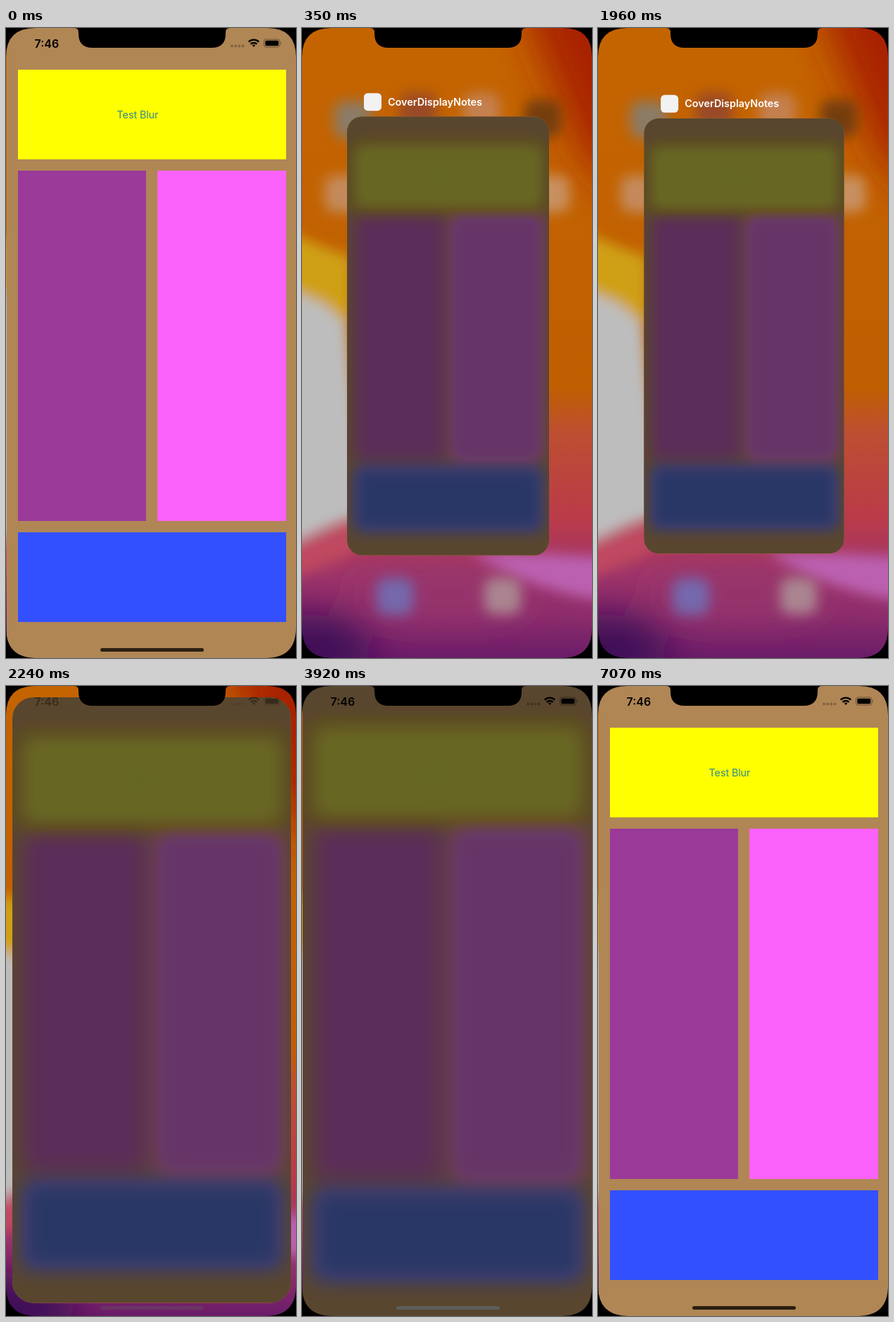
An HTML page that plays this animation: 412 by 892 pixels, repeating every 7.21 s.

```html
<!DOCTYPE html>
<html lang="en">
<head>
<meta charset="utf-8">
<title>Blurred app switcher</title>
<style>
  html, body { margin: 0; width: 100%; height: 100%; overflow: hidden; background: #000; }
  svg { display: block; width: 100%; height: 100%; }
  text { font-family: Inter, "Liberation Sans", sans-serif; }
</style>
</head>
<body>
<svg viewBox="0 0 412 892">
  <defs>
    <linearGradient id="sky" x2="0" y2="1">
      <stop offset="0" stop-color="#c46400"/>
      <stop offset=".57" stop-color="#c05f02"/>
      <stop offset=".64" stop-color="#bd4f30"/>
      <stop offset=".78" stop-color="#ba3a4a"/>
      <stop offset=".86" stop-color="#a03668"/>
      <stop offset=".93" stop-color="#8e2d6c"/>
      <stop offset="1" stop-color="#6a1c68"/>
    </linearGradient>
    <filter id="soft" x="-50%" y="-50%" width="200%" height="200%"><feGaussianBlur stdDeviation="9"/></filter>
    <filter id="wide" x="-80%" y="-80%" width="260%" height="260%"><feGaussianBlur stdDeviation="28"/></filter>
    <clipPath id="card"><rect width="412" height="892" rx="31"/></clipPath>
  </defs>

  <!-- home screen -->
  <rect width="412" height="892" fill="url(#sky)"/>
  <g filter="url(#wide)">
    <path d="M300 -60H480V260L400 180Z" fill="#a82400"/>
    <ellipse cx="10" cy="880" rx="90" ry="50" fill="#3d0a56"/>
    <ellipse cx="200" cy="800" rx="120" ry="30" fill="#96346c"/>
  </g>
  <g filter="url(#soft)">
    <path d="M-30 285L30 310L70 325V420L-30 385Z" fill="#cfa015"/>
    <path d="M-30 366L30 390L64 420L90 690L50 702L-30 738Z" fill="#bdbdbd"/>
    <path d="M-30 742L60 706L110 720L60 750L-30 785Z" fill="#c04860"/>
    <path d="M240 742L340 744L440 750V812Q330 800 240 742Z" fill="#bb60b0"/>
  </g>
  <g id="icons" filter="url(#soft)"></g>

  <!-- app card -->
  <g id="app">
    <g clip-path="url(#card)">
      <g id="content">
        <rect x="-80" y="-80" width="572" height="1052" fill="#b08655"/>
        <rect x="16" y="59" width="381" height="127" fill="#ff0"/>
        <rect x="16" y="202" width="182" height="496" fill="#9b3a99"/>
        <rect x="214" y="202" width="183" height="496" fill="#fb62fb"/>
        <rect x="16" y="714" width="381" height="127" fill="#3350ff"/>
        <text x="156.5" y="128" font-size="14.5" letter-spacing="-.15" fill="#348c8c">Test Blur</text>
      </g>
      <rect id="tint" width="412" height="892" fill="#313131"/>
    </g>
  </g>

  <g id="title">
    <rect width="25" height="25" rx="5.5" fill="#f2f2f2"/>
    <text x="34" y="17.5" font-size="14.4" font-weight="600" fill="#fff">CoverDisplayNotes</text>
  </g>

  <!-- status bar and home indicator -->
  <g id="status">
    <text x="40.5" y="27.5" font-size="16" font-weight="600">7:46</text>
    <path d="M321 25.5h17" stroke="#000" stroke-opacity=".25" stroke-width="4" stroke-linecap="round" stroke-dasharray="0 5.2"/>
    <g fill="none" stroke="#000" stroke-width="2.4">
      <path d="M344.8 19.6a10.2 10.2 0 0 1 14.4 0M347.6 22.8a6.2 6.2 0 0 1 8.8 0"/>
      <path d="M349.8 24.6a3.2 3.2 0 0 1 4.4 0L352 27Z" fill="#000" stroke="none"/>
    </g>
    <rect x="366.5" y="16" width="22.5" height="11" rx="3" fill="none" stroke="#000" stroke-opacity=".4"/>
    <rect x="368.3" y="17.8" width="19" height="7.4" rx="1.6"/>
    <path d="M390.4 19.6q1.6 1.9 0 3.8z" fill-opacity=".5"/>
    <rect id="bar" x="134" y="878" width="147" height="5" rx="2.5"/>
  </g>

  <!-- phone bezel -->
  <path fill-rule="evenodd" d="M0 0H412V892H0Z M42 0H371Q412 0 412 41V849Q412 892 369 892H43Q0 892 0 849V41Q0 0 42 0Z"/>
  <path d="M97 0Q103 0 103 6V8Q103 28 123 28H292Q312 28 312 8V6Q312 0 318 0Z"/>
</svg>
<script>
const LOOP = 7210, STEP = 70;
const $ = id => document.getElementById(id);
const ramp = (t, a, b) => Math.min(1, Math.max(0, (t - a) / (b - a)));
const easeOut = x => 1 - (1 - x) ** 3;
const easeInOut = x => x * x * (3 - 2 * x);

$('icons').innerHTML = [
  [72, 130, '#8a7c68'], [165, 118, '#9a4a26'], [255, 118, '#c48050'], [342, 128, '#743c10'],
  [58, 235, '#c48a5c'], [354, 235, '#c89060'], [132, 805, '#7468ac'], [285, 804, '#aa8490']
].map(([x, y, c]) => `<rect x="${x - 26}" y="${y - 26}" width="52" height="52" rx="14" fill="${c}"/>`).join('');

function draw(t) {
  // away: 0 = full screen, 1 = card in the switcher
  const away = easeInOut(ramp(t, 0, 350)) * (1 - easeOut(ramp(t, 1960, 2520)));
  const settle = easeOut(ramp(t, 350, 840)) * away;
  const blur = t < 3000
    ? ramp(t, 35, 330) * (1 - easeInOut(ramp(t, 2380, 2800)))
    : easeOut(ramp(t, 3150, 3850)) * (1 - easeInOut(ramp(t, 6650, 7070)));

  const scale = 1 - .303 * away - .006 * settle;
  const left = 207 + .5 * away - 206 * scale;
  const top = 446 - 10 * away - 446 * scale;
  $('app').setAttribute('transform', `translate(${left} ${top}) scale(${scale})`);
  $('content').style.filter = blur ? `blur(${15 * blur}px) saturate(${1 + .8 * blur})` : 'none';
  $('tint').setAttribute('opacity', .733 * blur);

  $('title').setAttribute('transform', `translate(${left + 24} ${top - 33})`);
  $('title').setAttribute('opacity', ramp(away, .55, .95));
  $('status').setAttribute('opacity', 1 - ramp(away, 0, .2));
  const c = ch => ch + (92 - ch) * blur;
  $('bar').setAttribute('fill', `rgb(${c(42)},${c(30)},${c(18)})`);
}

const start = performance.now();
function frame() {
  const t = (performance.now() - start) % LOOP;
  draw(Math.floor(t / STEP) * STEP);
  requestAnimationFrame(frame);
}
frame();
</script>
</body>
</html>
```
